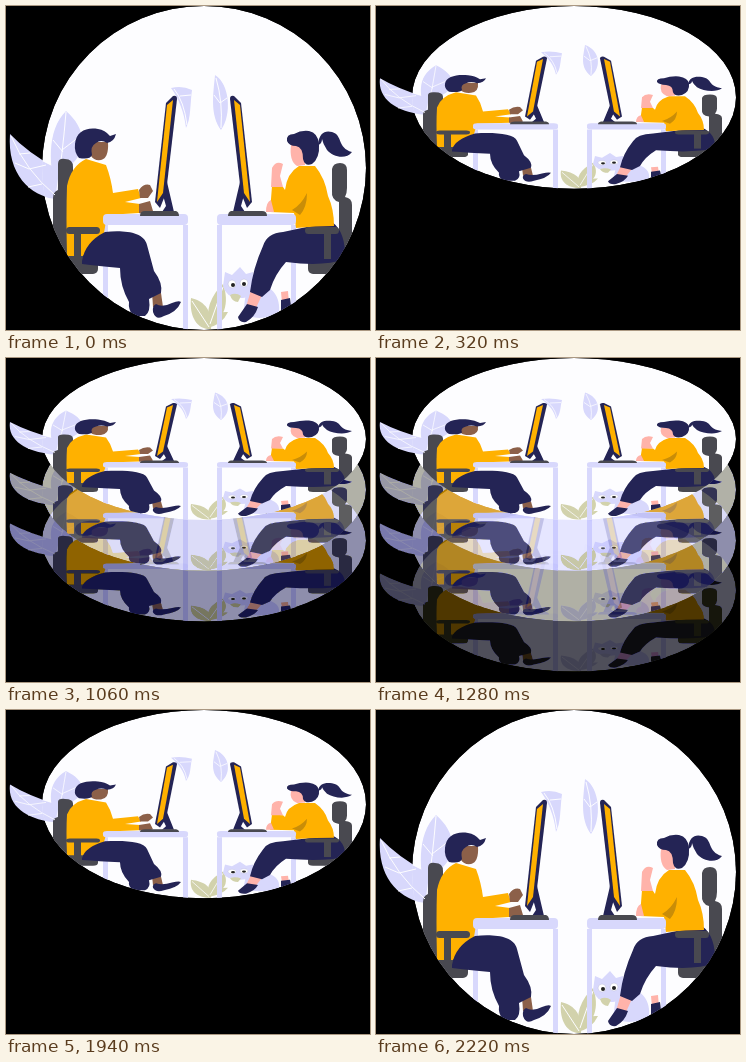
Animation of 364x324 px, one loop 2560 ms. Source, as an HTML page:

```html
<!DOCTYPE html>
<html lang="en">
<head>
<meta charset="utf-8">
<title>Stacked layers</title>
<style>
  html, body { margin: 0; width: 100%; height: 100%; overflow: hidden; background: #000; }
  svg { display: block; width: 100%; height: 100%; }
  .navy { fill: #242455; }
  .grey { fill: #494950; }
  .gold { fill: #ffb100; }
  .lilac { fill: #d8d8fc; }
  .skin { fill: #8c6049; }
  .pink { fill: #ffb3aa; }
  .olive { fill: #d2d2ac; }
  .vein { fill: none; stroke: #fdfdff; stroke-width: 1; }
</style>
</head>
<body>
<svg viewBox="0 0 364 324">
  <defs>
    <clipPath id="disc"><circle cx="198" cy="162" r="162"/></clipPath>

    <!-- Shifts the greys of the dimmed sheets between warm and cool -->
    <filter id="tint" filterUnits="userSpaceOnUse" x="0" y="0" width="364" height="324" color-interpolation-filters="sRGB">
      <feComponentTransfer>
        <feFuncB type="table" tableValues="0 .05 .32 .35 .38 .66 .69 .65 .92 1 1"/>
      </feComponentTransfer>
    </filter>

    <g id="monitor">
      <path class="navy" d="M155 182L161 176L168 206H156L160 200Z"/>
      <path class="navy" d="M160 97L167 90Q171 89 171 93L160 187L154 202L149 196Z"/>
      <path class="gold" d="M161 99L167 94L157 187L151 196Z"/>
      <path class="grey" d="M134 210Q134 205 139 205H170Q173 206 173 210Z"/>
    </g>

    <g id="scene">
      <path class="lilac" d="M4 128Q22 147 50 162V193C24 190 1 168 4 128Z"/>
      <path class="lilac" d="M60 105C80 122 82 145 64 160L51 192C43 161 40 125 60 105Z"/>
      <g clip-path="url(#disc)">
        <circle cx="198" cy="162" r="162" fill="#fdfdff"/>
        <g class="lilac">
          <path d="M30 152L50 162V193Q43 193 37 190Z"/>
          <path d="M60 105C80 122 82 145 64 160L51 192C43 161 40 125 60 105Z"/>
          <path d="M165 82Q176 79 186 84C184 98 185 113 180 122C178 106 173 93 165 82Z"/>
          <path d="M209 69C224 78 226 109 215 124C204 109 207 90 209 69Z"/>
        </g>
        <path class="vein" d="M60 106Q57 145 50 190M56 144L73 131M47 134L57 146M168 83Q178 95 181 119M174 90L185 89M210 72Q217 96 215 122M208 89L214 97L221 92"/>

        <!-- chairs -->
        <g class="grey">
          <path d="M52 158Q52 152 59 153Q67 153 67 161V176Q66 183 61 185V250H47V192Q47 186 52 184Z"/>
          <rect x="46" y="249" width="46" height="19" rx="5"/>
          <path d="M326 163Q327 157 334 157Q341 157 341 164V182Q341 187 339 191Q346 192 346 199V262H333V196Q325 194 326 184Z"/>
          <rect x="302" y="249" width="46" height="19" rx="5"/>
        </g>

        <g class="olive">
          <path d="M217 278C224 297 218 314 203 320Q198 296 217 278Z"/>
          <path d="M185 292C199 295 207 306 205 323C192 324 183 312 185 292Z"/>
          <path d="M201 319Q206 305 222 306Q216 319 201 322Z"/>
        </g>
        <path class="vein" d="M217 281L204 318M186 295L203 321"/>

        <path fill="none" stroke="#d8d8fc" stroke-width="5" d="M99.500 322V219M179.500 324V219M213.500 324V219M287.500 322V219"/>

        <!-- cat -->
        <g class="lilac">
          <path d="M240 285C258 272 275 285 273 306Q258 316 237 309Z"/>
          <path d="M219 266L226 269L234 261L240 268L247 266L249 281Q246 293 232 292Q220 291 217 280Z"/>
        </g>
        <g fill="#fff" stroke="#b9b9d8" stroke-width=".5">
          <circle cx="226" cy="278" r="4"/><circle cx="238" cy="277" r="4"/>
        </g>
        <circle cx="227" cy="279" r="2" fill="#222"/><circle cx="238" cy="278" r="2" fill="#222"/>
        <path class="olive" d="M224 289Q230 286 235 290L232 296Q226 296 224 289Z"/>

        <!-- left sitter -->
        <path class="skin" d="M146 286L155 287L157 301H147Z"/>
        <path class="gold" d="M80 153L100 159Q105 172 107 187L132 183L135 192L119 196L134 198L133 207L101 209L98 227Q86 238 77 250H61Q60 208 61 180Q65 160 80 153Z"/>
        <path class="navy" d="M76 255Q79 236 99 226C118 224 138 226 141 239L148 265Q157 277 155 287L143 293Q145 306 139 310H127Q122 303 123 296Q114 280 114 262Q92 260 76 258Z"/>
        <path class="navy" d="M147 306Q146 300 150 298Q156 302 166 297Q173 294 175 296Q171 306 158 310Q150 315 147 306Z"/>
        <path class="skin" d="M133 184Q138 177 144 179L147 185L142 192L134 192ZM133 198L144 195L147 205L140 209L133 207Z"/>
        <path class="skin" d="M85 136H102Q103 152 95 154Q88 155 85 150Z"/>
        <path class="navy" d="M73 152Q68 146 69 138C70 125 81 121 92 123Q99 124 104 130L110 128Q108 136 101 137Q95 133 90 137Q84 140 86 149Q84 154 73 152Z"/>

        <!-- right sitter -->
        <path class="pink" d="M245 284L256 289L250 302L240 301ZM275 286L282 285L283 297H276Z"/>
        <path class="navy" d="M326 216Q340 226 339 253Q318 261 280 256Q269 268 264 284L256 291L244 286Q247 262 257 240Q261 227 277 226L310 219Z"/>
        <path class="navy" d="M241 298L252 301Q249 311 240 316Q233 317 232 311ZM275 294L284 292L285 300L275 305Z"/>
        <path class="gold" d="M293 160L309 160Q319 172 322 190Q328 203 328 220Q310 220 290 222L288 207L264 206L266 180L277 181L279 184Q281 167 293 160Z"/>
        <path fill="#c98d08" d="M286 204Q295 199 301 187Q301 201 294 209Z"/>
        <path class="pink" d="M265 181L266 162Q270 154 277 158L274 170L277 181ZM260 206Q260 196 265 194L268 206Z"/>
        <path class="pink" d="M285 139H299V159L291 160Q283 155 285 139Z"/>
        <path class="navy" d="M281 135Q280 128 288 128Q295 124 303 125Q312 127 313 138Q314 152 306 158Q299 161 297 153Q297 141 290 140Q283 140 281 135Z"/>
        <path class="navy" d="M312 139C313 127 319 124 326 126C337 129 331 142 346 146C340 154 327 151 321 144Q317 138 316 133Q316 138 312 139Z"/>

        <g class="lilac">
          <rect x="97" y="208" width="85" height="11" rx="4"/>
          <rect x="211" y="208" width="79" height="11" rx="4"/>
        </g>
        <use href="#monitor"/>
        <use href="#monitor" transform="matrix(-1 0 0 1 395 0)"/>

        <g class="grey">
          <rect x="60" y="221" width="34" height="7" rx="3.500"/>
          <rect x="68" y="225" width="7" height="28"/>
          <rect x="299" y="221" width="34" height="7" rx="3.500"/>
          <rect x="318" y="225" width="7" height="28"/>
        </g>
      </g>
      <path class="vein" d="M5 130Q20 165 49 189M13 148L24 147M23 163L40 159M23 163L9 157M36 178L22 181"/>
    </g>
  </defs>
  <rect width="364" height="324"/>
  <g id="below" filter="url(#tint)"><rect width="364" height="324"/></g>
  <use id="top" href="#scene"/>
</svg>
<script>
  const LOOP = 2560, GAP = 50.7;
  // Slide-out window and opacity of each sheet under the top one
  const sheets = [
    { from: 540, to: 620, alpha: .7 },
    { from: 770, to: 1060, alpha: .56 },
    { from: 1110, to: 1300, alpha: .31 }
  ];
  const top_ = document.getElementById('top');
  const below = document.getElementById('below');

  for (const sheet of sheets) {
    sheet.node = document.createElementNS('http://www.w3.org/2000/svg', 'use');
    sheet.node.setAttribute('href', '#scene');
    sheet.node.setAttribute('opacity', sheet.alpha);
    below.firstElementChild.after(sheet.node);
  }

  const span = (t, a, b) => Math.min(1, Math.max(0, (t - a) / (b - a)));
  const easeOut = p => 1 - (1 - p) ** 2.5;
  const easeIn = p => p ** 2.5;

  function place(node, scale, y) {
    node.setAttribute('transform', `matrix(1 0 0 ${scale} 0 ${y})`);
  }

  function draw(t) {
    const scale = 1 - .5 * (easeOut(span(t, 15, 560)) - easeIn(span(t, 1680, 2220)));
    const spread = 1 - easeIn(span(t, 1680, 1920));
    place(top_, scale, 0);
    sheets.forEach(({ node, from, to }, i) => {
      const y = (i + 1) * GAP * easeOut(span(t, from, to)) * spread;
      place(node, scale, y);
      node.style.display = y < .01 ? 'none' : '';
    });
  }

  const start = performance.now();
  function tick() {
    draw((performance.now() - start) % LOOP);
    requestAnimationFrame(tick);
  }
  draw(0);
  requestAnimationFrame(tick);
</script>
</body>
</html>
```
